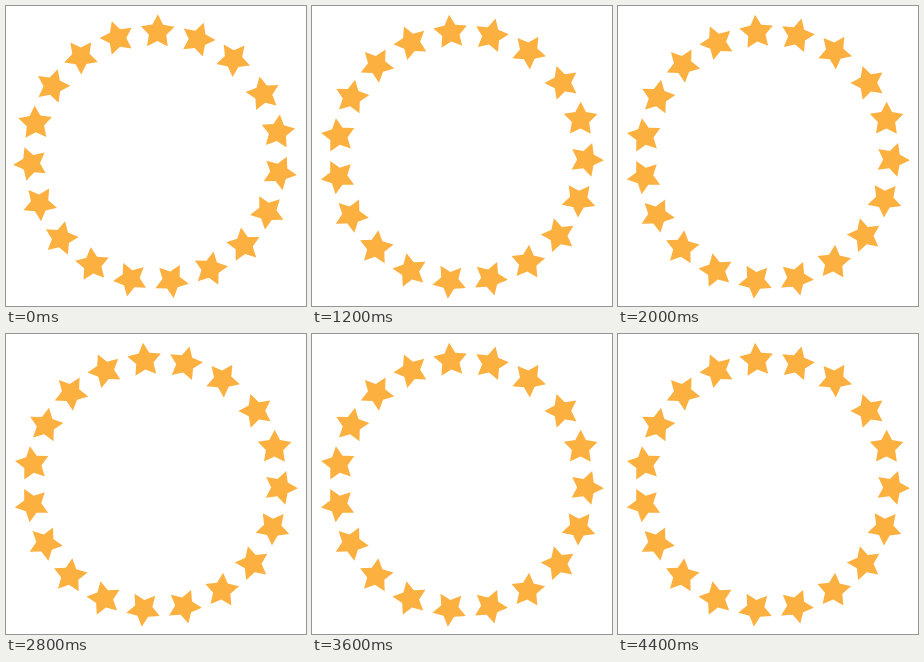
These frames come from a looping animation (300x300 px, 4.6 s). An HTML page with a canvas:

```html
<!DOCTYPE html>
<html lang="en">
<head>
<meta charset="utf-8">
<title>Star ring</title>
<style>
  html, body { margin: 0; width: 100%; height: 100%; overflow: hidden; background: #fff; }
  canvas { display: block; width: 300px; height: 300px; }
</style>
</head>
<body>
<canvas id="stage" width="300" height="300"></canvas>
<script>
const ctx = document.getElementById('stage').getContext('2d');
const LOOP = 4600, STEP = 200;
const CENTER = { x: 149.5, y: 150.8 };
const RING = 124.8, OUTER = 17.7, INNER = 9.1;
const COUNT = 19, FIRST = 59.7, SPACING = 18.83;
const POSES = [0, -9, -6, -3]; // ring rotation in degrees, held for one step each
const rad = deg => deg * Math.PI / 180;

// Star pointing away from the ring's center
function star(angle) {
  ctx.save();
  ctx.rotate(rad(angle));
  ctx.translate(0, -RING);
  ctx.beginPath();
  for (let i = 0; i < 10; i++) {
    const r = i % 2 ? INNER : OUTER;
    const a = rad(i * 36);
    ctx.lineTo(r * Math.sin(a), -r * Math.cos(a));
  }
  ctx.closePath();
  ctx.fill();
  ctx.restore();
}

function draw(time) {
  const step = Math.floor((time % LOOP) / STEP);
  const turn = POSES[step % POSES.length];
  ctx.fillStyle = '#fff';
  ctx.fillRect(0, 0, 300, 300);
  ctx.save();
  ctx.translate(CENTER.x, CENTER.y);
  ctx.fillStyle = '#fbb040';
  for (let i = 0; i < COUNT; i++) star(FIRST + i * SPACING + turn);
  ctx.restore();
}

const start = performance.now();
function tick() {
  draw(performance.now() - start);
  requestAnimationFrame(tick);
}
tick();
</script>
</body>
</html>
```
